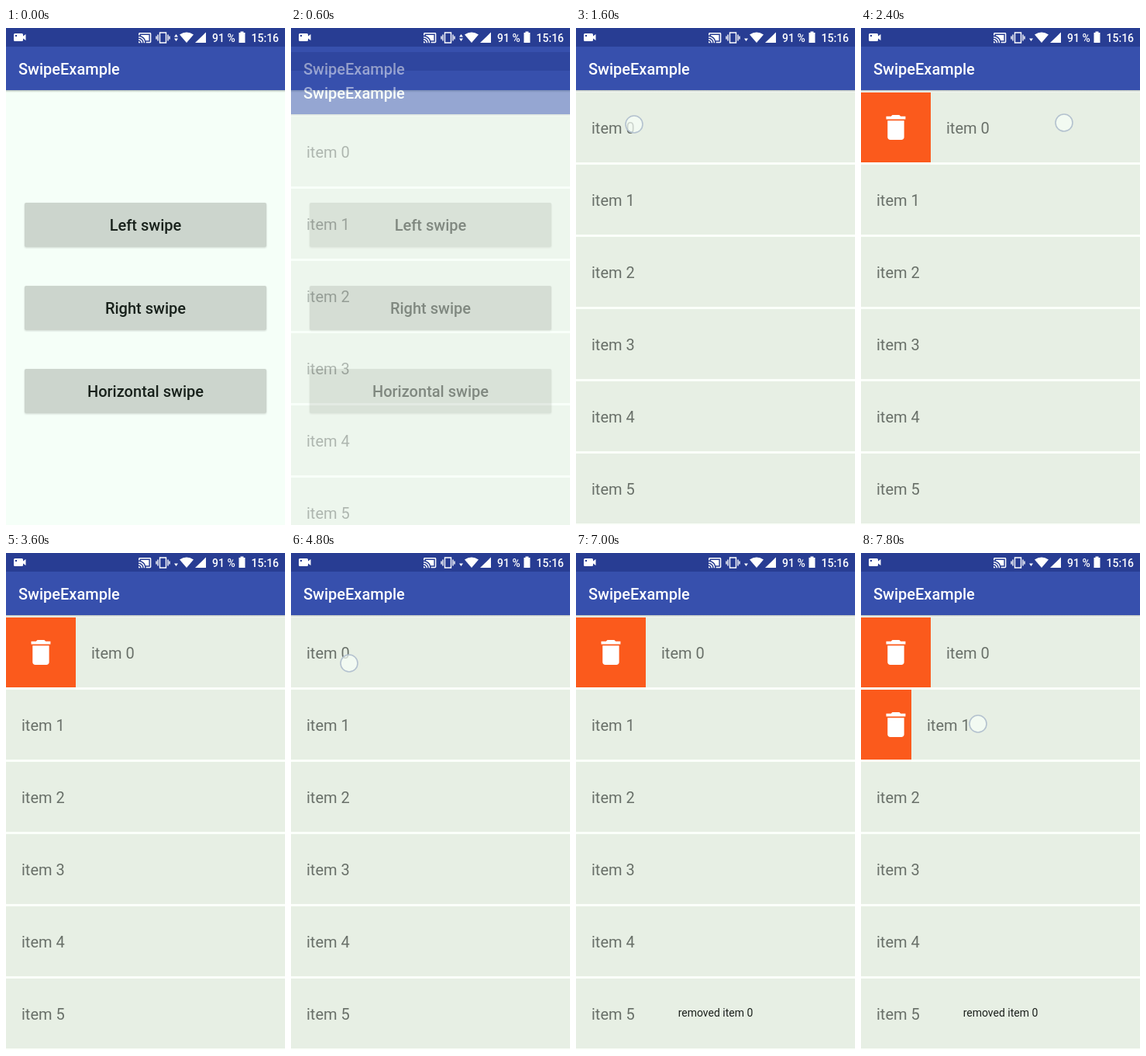
An HTML page that plays this animation: 360 px wide and 640 px high, repeating every 8000 ms.

```html
<!DOCTYPE html>
<html lang="en">
<head>
<meta charset="utf-8">
<title>SwipeExample</title>
<style>
  html, body { margin: 0; width: 100%; height: 100%; overflow: hidden; background: #f5fff8; }
  svg { display: block; width: 100%; height: 100%; }
  text { font-family: Roboto, "Noto Sans", sans-serif; font-size: 20px; }
  .medium { font-weight: 500; }
  .title { font-weight: 500; fill: #fff; }
  .button { fill: #ccd5cd; filter: drop-shadow(0 1px 1px rgba(0, 0, 0, .16)); }
  .label { font-weight: 500; fill: #18211b; text-anchor: middle; }
  .row { fill: #e7efe4; }
  .item { fill: #697069; }
  .small { font-size: 14px; }
</style>
</head>
<body>
<svg viewBox="0 0 360 640">
  <defs>
    <linearGradient id="shade" x2="0" y2="1">
      <stop stop-color="#26352c" stop-opacity=".3"/>
      <stop offset="1" stop-color="#26352c" stop-opacity="0"/>
    </linearGradient>
    <g id="bar">
      <path fill="#283d93" d="M0 0h360v24H0z"/>
      <path fill="#3750ad" d="M0 24h360v56H0z"/>
      <path fill="url(#shade)" d="M0 80h360v3H0z"/>
      <text class="title" x="16" y="60">SwipeExample</text>
    </g>
    <g id="bin">
      <path fill="#fb5a1c" d="M0 0h90v90H0z"/>
      <path fill="#fff" transform="translate(23.6 23.7) scale(1.78)"
        d="M6 19c0 1.1.9 2 2 2h8c1.1 0 2-.9 2-2V7H6zM19 4h-3.5l-1-1h-5l-1 1H5v2h14z"/>
    </g>
  </defs>

  <g id="home">
    <path fill="#f5fff8" d="M0 0h360v640H0z"/>
    <use href="#bar"/>
    <g id="buttons"></g>
  </g>

  <g id="list">
    <path fill="#fbfffa" d="M0 0h360v640H0z"/>
    <g id="rows"></g>
    <use href="#bar"/>
  </g>

  <g id="status" fill="#fff">
    <path d="M11.500 7h9q1.500 0 1.500 1.500v2l3.500-2.500v8l-3.500-2.500v2q0 1.500-1.500 1.500h-9q-1.500 0-1.500-1.500v-7q0-1.500 1.500-1.500z"/>
    <path fill="#283d93" d="M12 9h2v2h-2z"/>
    <path transform="translate(170.300 3.700) scale(.74)"
      d="M21 3H3c-1.100 0-2 .9-2 2v3h2V5h18v14h-7v2h7c1.100 0 2-.9 2-2V5c0-1.100-.9-2-2-2zM1 18v3h3c0-1.660-1.340-3-3-3zm0-4v2c2.760 0 5 2.240 5 5h2c0-3.870-3.130-7-7-7zm18-7H5v1.630c3.960 1.280 7.090 4.410 8.370 8.370H19zM1 10v2c4.970 0 9 4.030 9 9h2c0-6.080-4.930-11-11-11z"/>
    <path fill="none" stroke="#fff" stroke-width="1.400" d="M198.500 6h8v13h-8zM196 8.500v8M209 8.500v8M194 10.500v4M211 10.500v4"/>
    <path id="up" d="M217 11.500l2.500-3.500 2.500 3.500z"/>
    <path d="M217 13.500h5l-2.500 3.500z"/>
    <path d="M224 8.500q9-6 18 0l-9 10.500z"/>
    <path d="M258 5.500v13.500h-14z"/>
    <text class="small medium" x="266" y="17.500">91 %</text>
    <path d="M302.500 6v-1.500h4v1.500h2v13h-8v-13z"/>
    <text class="small medium" x="316.500" y="17.500">15:16</text>
  </g>

  <text id="toast" class="small" x="180" y="597" text-anchor="middle" fill="#1c211d">removed item 0</text>
  <circle id="dot" r="11" fill="#f7fff8" fill-opacity=".7" stroke="#b4c2cf" stroke-width="1.600"/>
</svg>

<script>
const LOOP = 8000, STEP = 200, OPEN = 90, SLOP = 11;
const $ = id => document.getElementById(id);
const clamp = (v, lo, hi) => Math.min(hi, Math.max(lo, v));
const lerp = (a, b, p) => a + (b - a) * p;

$("buttons").innerHTML = ["Left swipe", "Right swipe", "Horizontal swipe"].map((name, i) => {
  const y = 225 + i * 107;
  return `<rect class="button" x="24" y="${y}" width="312" height="57" rx="2"/>
    <text class="label" x="180" y="${y + 36}">${name}</text>`;
}).join("");

$("rows").innerHTML = Array.from({ length: 6 }, (_, i) =>
  `<g transform="translate(0 ${83 + i * 93})">
    <use href="#bin"/>
    <g class="slide"><path class="row" d="M0 0h360v90H0z"/>
    <text class="item" x="20" y="53">item ${i}</text></g>
  </g>`).join("");

const slides = document.querySelectorAll(".slide");
const pressed = document.querySelectorAll(".button")[1];

// Finger strokes: first and last moment, from point, to point
const strokes = [
  { start: 200, end: 400, from: [200, 362], to: [200, 362] },
  { start: 1600, end: 2400, from: [75, 124], to: [262, 122], row: 0 },
  { start: 3000, end: 3400, from: [32, 126], to: [324, 137], row: 0 },
  { start: 4000, end: 4800, from: [332, 138], to: [75, 142], row: 0 },
  { start: 5200, end: 6000, from: [75, 136], to: [304, 130], row: 0 },
  { start: 6400, end: 6600, from: [36, 130], to: [36, 130] },
  { start: 7400, end: 7800, from: [75, 218], to: [151, 220], row: 1 }
];

function draw(t) {
  const offsets = [0, 0];
  let touch = null;

  for (const s of strokes) {
    if (t < s.start) break;
    const p = clamp((t - s.start) / (s.end - s.start), 0, 1);
    const x = lerp(s.from[0], s.to[0], p);
    if (t <= s.end) touch = [x, lerp(s.from[1], s.to[1], p)];
    if (s.row === undefined) continue;
    const dx = x - s.from[0];
    const drag = Math.sign(dx) * Math.max(0, Math.abs(dx) - SLOP);
    offsets[s.row] = clamp(offsets[s.row] + drag, 0, OPEN);
  }

  offsets.forEach((x, i) => slides[i].setAttribute("transform", `translate(${x} 0)`));
  $("dot").style.display = touch ? "" : "none";
  if (touch) $("dot").setAttribute("transform", `translate(${touch})`);

  // The list fades in while rising, slowing down as it lands
  const enter = clamp((t - 400) / 400, 0, 1);
  $("list").style.opacity = enter;
  $("list").setAttribute("transform", `translate(0 ${t < 1000 ? 31 * 0.13 ** ((t - 600) / 200) : 0})`);
  pressed.style.fill = t >= 400 && t < 800 ? "#c3ccc4" : "";

  $("up").style.display = t < 1400 ? "" : "none";
  $("toast").style.opacity = clamp((t - 6600) / 400, 0, 1);
}

const began = performance.now();
function tick() {
  const t = (performance.now() - began) % LOOP;
  draw(Math.floor(t / STEP) * STEP);
  requestAnimationFrame(tick);
}
tick();
</script>
</body>
</html>
```
